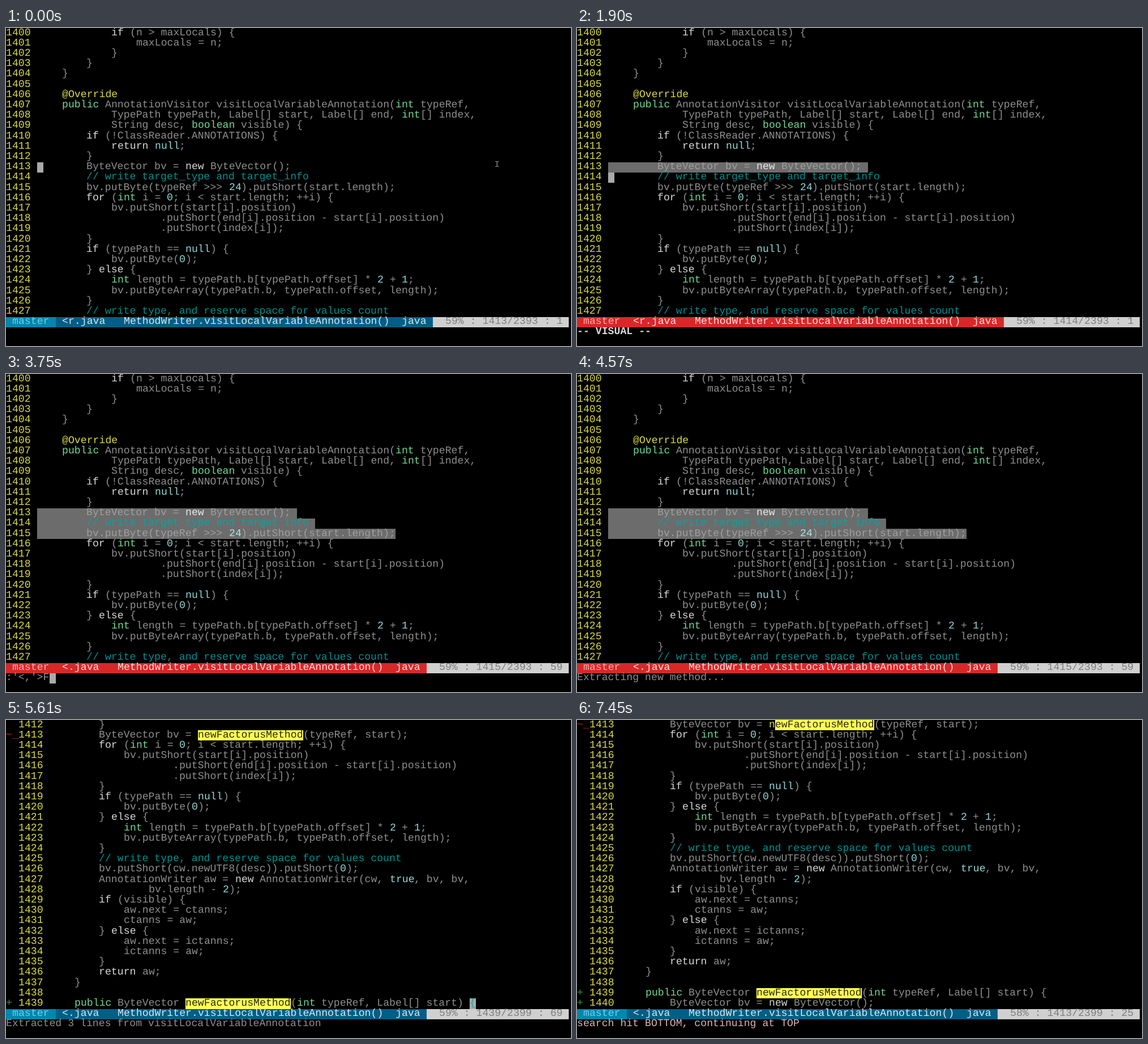
Write an HTML page that moves like this. It is 998 px wide and 561 px high and loops after 9920 ms.

```html
<!DOCTYPE html>
<html lang="en">
<head>
<meta charset="utf-8">
<title>Extract method in a terminal editor</title>
<style>
  html, body { margin: 0; width: 100%; height: 100%; overflow: hidden; background: #000; }
  svg { display: block; width: 998px; height: 561px; }
  text {
    font: 18.2px "Liberation Mono", "Courier New", monospace;
    fill: #a8a8a8; fill-opacity: .85;
    white-space: pre; text-rendering: geometricPrecision;
  }
  rect { shape-rendering: crispEdges; }
  .comment { fill: #00a8a8; }
  .note, .num { fill: #ffff54; }
  .type { fill: #87ffaf; }
  .word { fill: #fff; }
  .value { fill: #afffff; }
  .search, .dark { fill: #000; }
  .bold { fill: #fff; font-weight: bold; }
  .warn { fill: #ffd7d7; }
  .add { fill: #35b055; }
  .mod { fill: #e02020; }
  .branch { fill: #87d7ff; }
  .branchVisual { fill: #ffc4c4; }
  .pos { fill: #707070; }
</style>
</head>
<body>
<svg id="stage" viewBox="0 0 998 561"></svg>
<script>
const W = 10.92, H = 18.2, BASE = 12.6, LOOP = 9920;
const GREY = '#aaa', SELECT = '#6c6c6c', TEAL = '#00a8a8', YELLOW = '#ffff54';
const stage = document.getElementById('stage');

const loopPart = `
        for (int i = 0; i < start.length; ++i) {
            bv.putShort(start[i].position)
                    .putShort(end[i].position - start[i].position)
                    .putShort(index[i]);
        }
        if (typePath == null) {
            bv.putByte(0);
        } else {
            int length = typePath.b[typePath.offset] * 2 + 1;
            bv.putByteArray(typePath.b, typePath.offset, length);
        }
        // write type, and reserve space for values count`;

const vectorPart = `
        ByteVector bv = new ByteVector();
        // write target_type and target_info
        bv.putByte(typeRef >>> 24).putShort(start.length);`;

const before = {
  first: 1400, gutter: 0,
  lines: (`            if (n > maxLocals) {
                maxLocals = n;
            }
        }
    }

    @Override
    public AnnotationVisitor visitLocalVariableAnnotation(int typeRef,
            TypePath typePath, Label[] start, Label[] end, int[] index,
            String desc, boolean visible) {
        if (!ClassReader.ANNOTATIONS) {
            return null;
        }` + vectorPart + loopPart).split('\n')
};

const after = {
  first: 1412, gutter: 2,
  lines: (`        }
        ByteVector bv = newFactorusMethod(typeRef, start);` + loopPart + `
        bv.putShort(cw.newUTF8(desc)).putShort(0);
        AnnotationWriter aw = new AnnotationWriter(cw, true, bv, bv,
                bv.length - 2);
        if (visible) {
            aw.next = ctanns;
            ctanns = aw;
        } else {
            aw.next = ictanns;
            ictanns = aw;
        }
        return aw;
    }

    public ByteVector newFactorusMethod(int typeRef, Label[] start) {` + vectorPart + `
        return bv;
    }`).split('\n')
};

// The new signature is half drawn for one refresh.
const partial = { ...after, lines: after.lines.map(s => s.replace('Method(int', 'Methodnt')) };

const syntax = new RegExp([
  '(?<comment>//.*)', '(?<note>@\\w+)', '(?<search>newFactorusMethod)',
  '(?<type>\\b(?:public|int|boolean)\\b|nt(?= typeRef))',
  '(?<word>\\b(?:if|else|for|return|new)\\b)',
  '(?<value>\\b(?:null|true|\\d+)\\b)'
].join('|'), 'g');

const cellX = col => Math.ceil(col * W);
const cellY = row => Math.round(row * H);

function add(parent, tag, attrs, content) {
  const el = document.createElementNS('http://www.w3.org/2000/svg', tag);
  for (const key in attrs) el.setAttribute(key, attrs[key]);
  if (content) el.textContent = content;
  parent.append(el);
  return el;
}

function fill(g, row, from, to, color) {
  const x = cellX(from), y = cellY(row);
  add(g, 'rect', { x, y, width: cellX(to) - x, height: cellY(row + 1) - y, fill: color });
}

function write(g, row, col, str, cls = '') {
  const pad = str.length - str.trimStart().length;
  if (pad === str.length) return;
  add(g, 'text', { x: cellX(col + pad), y: row * H + BASE, class: cls }, str.trim());
}

function code(g, row, col, line) {
  let end = 0;
  for (const m of line.matchAll(syntax)) {
    const cls = Object.keys(m.groups).find(k => m.groups[k]);
    write(g, row, col + end, line.slice(end, m.index));
    end = m.index + m[0].length;
    if (cls === 'search') fill(g, row, col + m.index, col + end, YELLOW);
    write(g, row, col + m.index, m[0], cls);
  }
  write(g, row, col + end, line.slice(end));
}

function statusBar(g, visual, percent, line, total, column) {
  const right = `${percent}% : ${line}/${total} : ${column}`;
  const split = 88 - right.length;
  const wide = column < 10;
  fill(g, 28, 0, split, visual ? '#d72828' : '#005f87');
  if (!visual) fill(g, 28, 0, 8, '#0087af');
  fill(g, 28, split, 91, '#d0d0d0');
  write(g, 28, 1, 'master', visual ? 'branchVisual' : 'branch');
  write(g, 28, 9, wide ? '<r.java' : '<.java', 'word');
  write(g, 28, split - 50, 'MethodWriter.visitLocalVariableAnnotation()', 'word');
  write(g, 28, split - 5, 'java', 'word');
  write(g, 28, split + 2, right, 'pos');
}

function mouse(g) {
  add(g, 'path', {
    d: 'M864.5 235.5h2l.8 .8l.8-.8h2M867.3 236v8M864.5 244.5h2l.8-.8l.8 .8h2',
    fill: 'none', stroke: '#bbb', 'stroke-width': 1
  });
}

// Cells are [row, column, colour, character, class].
function scene(s) {
  const g = add(stage, 'g', { visibility: 'hidden' });
  const { first, gutter, lines } = s.text;
  const selected = s.selected || 0;
  for (let row = 0; row < 28; row++) {
    const no = s.top + row, line = lines[no - first];
    const inside = no >= 1413 && no < 1413 + selected;
    const newline = no < 1415 ? 1 : 0;
    if (inside) fill(g, row, 5, 5 + line.length + newline, SELECT);
    if (s.signs && no >= 1439) write(g, row, 0, '+', 'add');
    if (s.signs && no === 1413) write(g, row, 0, '~_', 'mod');
    write(g, row, gutter, String(no), 'num');
    code(g, row, gutter + 5, inside ? line.replace(/_/g, ' ') : line);
  }
  statusBar(g, s.visual, ...s.status);
  if (s.message) write(g, 29, 0, s.message, s.messageClass);
  for (const [row, col, color, char, cls] of s.cells || []) {
    fill(g, row, col, col + 1, color);
    if (char) write(g, row, col, char, cls);
  }
  if (s.mouse) mouse(g);
  return { at: s.at, g };
}

const start = { text: before, top: 1400, status: [59, 1413, 2393, 1], cells: [[13, 5, GREY]] };
const visual = { ...start, visual: true, message: '-- VISUAL --', messageClass: 'bold' };
const picked = { ...visual, selected: 3, status: [59, 1415, 2393, 59], cells: [[15, 63, GREY]] };
const prompt = typed => ({
  ...picked, message: ":'<,'>" + typed, messageClass: '', cells: [[29, 6 + typed.length, GREY]]
});
const done = {
  text: after, top: 1412, signs: true, status: [59, 1439, 2399, 5],
  message: 'Extracted 3 lines from visitLocalVariableAnnotation'
};

const scenes = [
  { ...start, at: 0, mouse: true },
  { ...visual, at: 1600, visual: false },
  { ...visual, at: 1650 },
  { ...visual, at: 1900, selected: 1, status: [59, 1414, 2393, 1], cells: [[14, 5, GREY]] },
  { ...visual, at: 2050, selected: 2, status: [59, 1415, 2393, 1], cells: [[15, 5, GREY]] },
  { ...picked, at: 2600 },
  { ...prompt(''), at: 3060 },
  { ...prompt('F'), at: 3750 },
  { ...prompt('FExtractMethod'), at: 3930 },
  { ...picked, at: 4570, message: 'Extracting new method...', messageClass: '', cells: [] },
  { ...done, at: 4950, text: partial, signs: false },
  { ...done, at: 5000, cells: [[27, 11, GREY, 'p', 'dark']] },
  { ...done, at: 5610, status: [59, 1439, 2399, 69], cells: [[27, 75, GREY, '{', 'comment']] },
  { ...done, at: 5830, top: 1417, status: [60, 1444, 2399, 5], message: '',
    cells: [[22, 75, TEAL, '{'], [27, 11, GREY, '}', 'comment']] },
  { ...done, at: 7450, top: 1413, status: [58, 1413, 2399, 25],
    message: 'search hit BOTTOM, continuing at TOP', messageClass: 'warn',
    cells: [[0, 31, '#000', 'n', 'num']] }
].map(scene);

const t0 = performance.now();
let shown;
function tick() {
  const t = (performance.now() - t0) % LOOP;
  const now = scenes.findLast(s => s.at <= t);
  if (now !== shown) {
    shown?.g.setAttribute('visibility', 'hidden');
    now.g.setAttribute('visibility', 'visible');
    shown = now;
  }
  requestAnimationFrame(tick);
}
tick();
</script>
</body>
</html>
```
